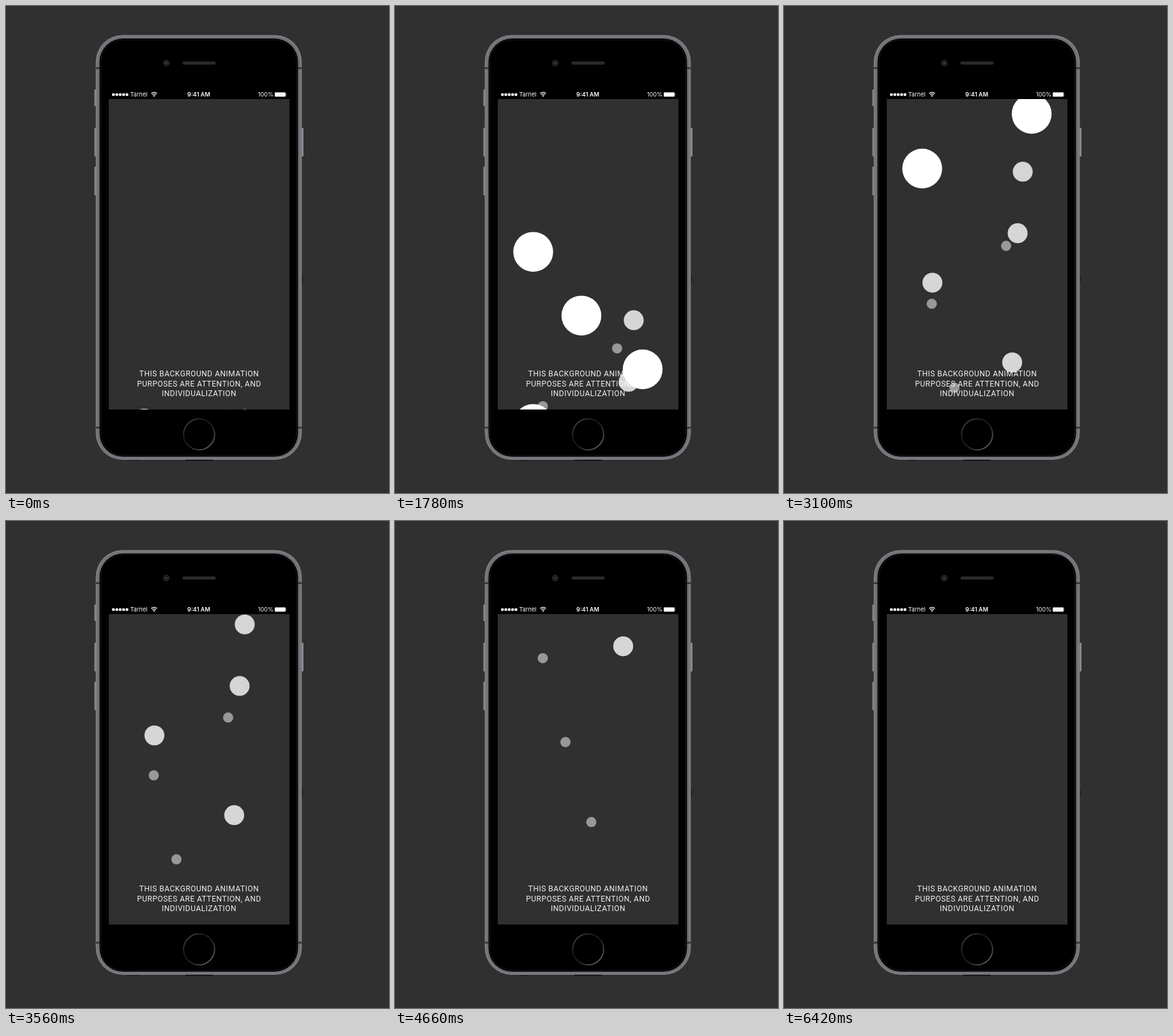
Animation of 600x764 px, one loop 6.44 s. Source, as an HTML page:

```html
<!DOCTYPE html>
<html lang="en">
<head>
<meta charset="utf-8">
<title>Rising circles</title>
<style>
  html, body { margin: 0; width: 100%; height: 100%; overflow: hidden; background: #303030; }
  svg { display: block; }
  .status { font: 9.2px Inter, Roboto, sans-serif; fill: #fff; }
  .time { font-weight: 600; text-anchor: middle; }
  .caption { font: 12px Roboto, sans-serif; letter-spacing: .5px; fill: #fff; fill-opacity: .92; text-anchor: middle; }
</style>
</head>
<body>
<svg width="600" height="764" viewBox="0 0 600 764">
  <defs>
    <linearGradient id="ring" x2="1" y2="1">
      <stop offset="0" stop-color="#555"/>
      <stop offset=".35" stop-color="#1c1c1c"/>
      <stop offset=".55" stop-color="#222"/>
      <stop offset="1" stop-color="#777"/>
    </linearGradient>
    <clipPath id="screen"><rect x="161" y="146" width="283" height="487"/></clipPath>
  </defs>

  <!-- side buttons -->
  <g fill="#8e8d93">
    <rect x="138.5" y="131" width="3" height="26" rx="1"/>
    <rect x="138.5" y="191" width="3" height="45" rx="1"/>
    <rect x="138.5" y="252" width="3" height="45" rx="1"/>
    <rect x="463" y="191" width="3" height="45" rx="1"/>
  </g>
  <path d="M464.5 422v11" stroke="#1b1b1b" stroke-width="1.5"/>

  <!-- body -->
  <rect x="140.5" y="45.5" width="323" height="666.5" rx="42" fill="#727177"/>
  <rect x="142" y="47" width="320" height="663.5" rx="41" fill="none" stroke="#88878d"/>
  <path d="M140.500 97.500h6m311 0h6M140.500 661.500h6m311 0h6" stroke="#3a3a3c" stroke-width="3"/>
  <rect x="146.5" y="51" width="311" height="656" rx="37"/>
  <rect x="148.5" y="53" width="307" height="652" rx="35" fill="none" stroke="#1d1d1e"/>
  <path d="M281 712.5h43" stroke="#0c0c0c" stroke-width="1.5"/>
  <path d="M194 712.500q7 3 14 0" fill="none" stroke="#1a1a1a"/>

  <!-- camera, speaker, home button -->
  <circle cx="251" cy="89.5" r="4.5" fill="#19191b" stroke="#38383a"/>
  <circle cx="251" cy="89.5" r="1.5" fill="#4a4a50"/>
  <rect x="276.5" y="87" width="52" height="5" rx="2.5" fill="#2a2a2b"/>
  <circle cx="302.5" cy="672" r="24.3" fill="none" stroke="url(#ring)" stroke-width="1.8"/>

  <!-- status bar -->
  <g fill="#fff">
    <circle cx="168.300" cy="139" r="2.300"/>
    <circle cx="173.600" cy="139" r="2.300"/>
    <circle cx="178.900" cy="139" r="2.300"/>
    <circle cx="184.200" cy="139" r="2.300"/>
    <circle cx="189.500" cy="139" r="2.300"/>
    <path d="M230.200 140.600L232 142.600l1.800-2q-1.800-1.400-3.600 0z"/>
    <rect x="421" y="135.500" width="17" height="6.800" rx="1"/>
    <path d="M438.800 137.500q1.600 1.400 0 2.800z"/>
  </g>
  <path d="M227.400 137.300q4.600-3.800 9.200 0M229 139.300q3-2.400 6 0" fill="none" stroke="#fff" stroke-width="1.300"/>
  <g class="status">
    <text x="194.5" y="142.2">Tarnel</text>
    <text class="time" x="302" y="142.2">9:41 AM</text>
    <text x="419" y="142.2" text-anchor="end">100%</text>
  </g>

  <rect x="161" y="146" width="283" height="487" fill="#303030"/>
  <g id="dots" clip-path="url(#screen)" fill="#fff"></g>
  <g class="caption">
    <text x="302.5" y="580.5">THIS BACKGROUND ANIMATION</text>
    <text x="302.5" y="596.5">PURPOSES ARE ATTENTION, AND</text>
    <text x="302.5" y="612">INDIVIDUALIZATION</text>
  </g>
</svg>
<script>
const LOOP = 6440, LEAD = 80;

// Back to front; each spot is [x, starting y].
const layers = [
  { r: 8, alpha: .5, travel: 850, time: 6408, spots: [[348, 641], [231.5, 731.8], [267, 863.5], [307.5, 989]] },
  { r: 15.6, alpha: .8, travel: 817, time: 4984, spots: [[374, 648.5], [366, 745], [232.5, 822.6], [357.5, 947.7]] },
  { r: 31.2, alpha: 1, travel: 819, time: 3560, spots: [[216.5, 664], [292, 764], [388, 848.3], [216.5, 934]] }
];

const dots = document.getElementById('dots');
for (const layer of layers) {
  layer.group = dots.appendChild(document.createElementNS(dots.namespaceURI, 'g'));
  for (const [x, y] of layer.spots) {
    const c = document.createElementNS(dots.namespaceURI, 'circle');
    const attrs = { cx: x, cy: y, r: layer.r, 'fill-opacity': layer.alpha };
    for (const name in attrs) c.setAttribute(name, attrs[name]);
    layer.group.appendChild(c);
  }
}

// cubic-bezier(.42, 0, 1, 1), solved by bisection
function easeIn(x) {
  let lo = 0, hi = 1;
  for (let i = 0; i < 24; i++) {
    const s = (lo + hi) / 2;
    if (1.26 * s + .48 * s * s - .74 * s ** 3 < x) lo = s; else hi = s;
  }
  return lo * lo * (3 - 2 * lo);
}

const start = performance.now();
function draw() {
  const now = Math.max(0, performance.now() - start) % LOOP;
  const t = now - now % 20 + LEAD;
  for (const { group, travel, time } of layers) {
    group.setAttribute('visibility', t < time ? 'visible' : 'hidden');
    group.setAttribute('transform', `translate(0 ${-travel * easeIn(t / time)})`);
  }
  requestAnimationFrame(draw);
}
draw();
</script>
</body>
</html>
```
